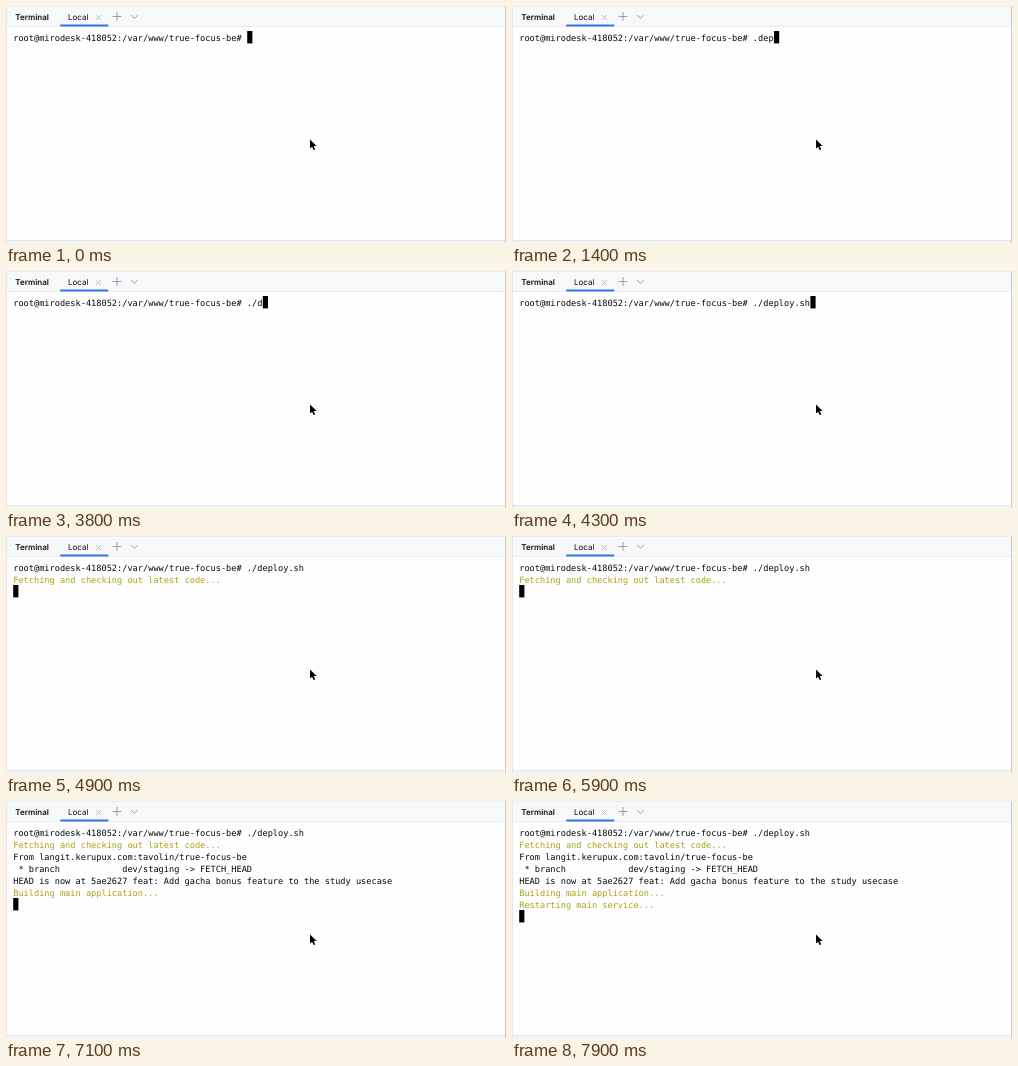
An HTML page that plays this animation: 500x237 px, repeating every 8000 ms.

```html
<!DOCTYPE html>
<html lang="en">
<head>
<meta charset="utf-8">
<title>Terminal deploy</title>
<style>
  html, body { margin: 0; width: 100%; height: 100%; overflow: hidden; background: #fff; }
  svg { display: block; width: 500px; height: 237px; }
  text { white-space: pre; text-rendering: geometricPrecision; }
  .ui { font: 8px Inter, sans-serif; fill: #111; }
  .bold { font-weight: 600; }
  #lines { font: 8.638px "DejaVu Sans Mono", monospace; fill: #080808; }
  #lines .info { fill: #aaa316; }
  .icon { fill: none; stroke: #868a96; stroke-width: .8; }
</style>
</head>
<body>
<svg viewBox="0 0 500 237">
  <rect width="500" height="237" fill="#fefefe"/>
  <rect width="500" height="21" fill="#f7f8fa"/>
  <path d="M0 .5H500M0 20.5H500" stroke="#ebecf0"/>
  <rect y="234" width="500" height="3" fill="#f3f4f6"/>
  <path d="M0 234.5H500M.5 0V237" stroke="#e6e7eb"/>
  <path d="M499.5 0V237" stroke="#c9cbd0"/>
  <text class="ui bold" x="9.3" y="14">Terminal</text>
  <text class="ui" x="62" y="14">Local</text>
  <rect x="54" y="18.4" width="48.5" height="2.2" rx="1" fill="#3574f0"/>
  <path class="icon" d="M90 9.2l4.8 4.8m0-4.8l-4.8 4.8" style="stroke:#adb0ba"/>
  <path class="icon" d="M106.5 10.5h9M111 6v9M125 9l3.4 3.4L131.8 9"/>
  <g id="lines"></g>
  <rect id="cursor" width="5.2" height="12.4" fill="#000"/>
  <path d="M304 133.4v9.2l2.1-1.9 1.5 3.4 1.6-.7-1.5-3.3h2.9z" fill="#000" stroke="#fff" stroke-width=".7" paint-order="stroke"/>
</svg>
<script>
const LOOP = 8000, LEFT = 7.2, TOP = 25, CELL = 5.2, ROW = 12;
const PROMPT = 'root@mirodesk-418052:/var/www/true-focus-be# ';

// Command line as typed: [time, text]
const typing = [
  [0, ''], [800, '.'], [1100, '.d'], [1200, '.de'], [1400, '.dep'],
  [2400, '.de'], [2500, '.d'], [2700, '.'], [3300, './'],
  [3800, './d'], [3900, './de'], [4000, './dep'], [4300, './deploy.sh']
];

// Printed lines: [time, text, is status message]
const output = [
  [4900, 'Fetching and checking out latest code...', true],
  [7000, 'From langit.kerupux.com:tavolin/true-focus-be'],
  [7000, ' * branch            dev/staging -> FETCH_HEAD'],
  [7100, 'HEAD is now at 5ae2627 feat: Add gacha bonus feature to the study usecase'],
  [7100, 'Building main application...', true],
  [7900, 'Restarting main service...', true]
];

// Times when the cursor turns solid and its blink restarts
const wakes = [-200, ...typing.slice(1).map(k => k[0]), ...output.map(k => k[0])];

const lines = document.getElementById('lines');
const cursor = document.getElementById('cursor');

function addLine(text, row, info) {
  const el = document.createElementNS('http://www.w3.org/2000/svg', 'text');
  el.setAttribute('x', LEFT);
  el.setAttribute('y', TOP + 9.7 + row * ROW);
  if (info) el.setAttribute('class', 'info');
  el.textContent = text;
  lines.append(el);
  return el;
}

const command = addLine(PROMPT, 0);
const printed = output.map(([, text, info], i) => addLine(text, i + 1, info));

function draw(t) {
  const text = PROMPT + typing.findLast(k => k[0] <= t)[1];
  if (command.textContent !== text) command.textContent = text;

  const count = output.filter(k => k[0] <= t).length;
  printed.forEach((el, i) => el.setAttribute('visibility', i < count ? 'visible' : 'hidden'));

  const idle = t - wakes.findLast(w => w <= t);
  cursor.setAttribute('x', LEFT + (count ? 0 : text.length * CELL));
  cursor.setAttribute('y', TOP + (count ? count + 1 : 0) * ROW);
  cursor.setAttribute('visibility', idle % 1000 < 500 ? 'visible' : 'hidden');
}

function tick() {
  draw(performance.now() % LOOP);
  requestAnimationFrame(tick);
}
tick();
</script>
</body>
</html>
```
